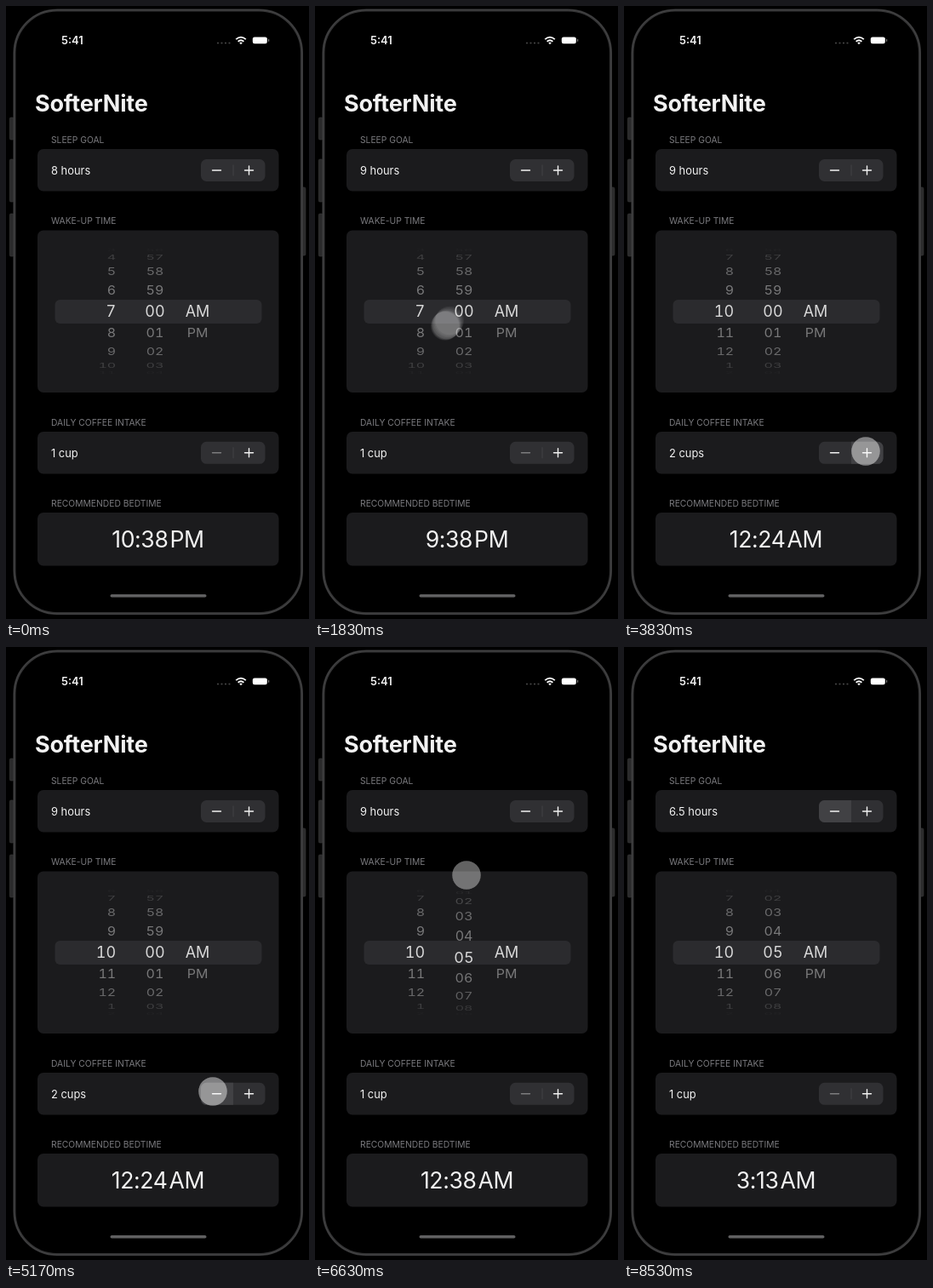
An HTML page for the animation above (8760 ms loop, 356 by 720 pixels).

```html
<!DOCTYPE html>
<html lang="en">
<head>
<meta charset="utf-8">
<title>Bedtime planner</title>
<style>
  html, body { margin: 0; width: 100%; height: 100%; overflow: hidden; background: #000; }
  svg { display: block; width: 100vw; height: 100vh; font-family: Inter, Roboto, sans-serif; fill: #f2f2f2; }
  .card { fill: #1b1b1d; }
  .head { font-size: 10.3px; fill: #7b7b7f; }
  .value { font-size: 12.9px; }
  .row { font-size: 18px; font-variant-numeric: tabular-nums; }
  .line { fill: none; stroke: #f2f2f2; stroke-width: 1.4; stroke-linecap: round; }
</style>
</head>
<body>
<svg id="stage" viewBox="0 0 356 720" xmlns="http://www.w3.org/2000/svg">
  <rect width="356" height="720" fill="#000"/>
  <g fill="#2b2b2c" stroke="#3b3b3c" stroke-width=".6">
    <rect x="4.3" y="131" width="5" height="26" rx="1.5"/>
    <rect x="4.3" y="180" width="5" height="50" rx="1.5"/>
    <rect x="4.3" y="244" width="5" height="50" rx="1.5"/>
    <rect x="347.5" y="213" width="4.5" height="80" rx="1.5"/>
  </g>
  <rect x="10" y="5" width="337.5" height="708.5" rx="50" fill="#000" stroke="#353536" stroke-width="3"/>
  <rect x="9.4" y="4.4" width="338.7" height="709.7" rx="50.6" fill="none" stroke="#444445" stroke-width="1"/>

  <text x="65" y="44.8" font-size="13" font-weight="600">5:41</text>
  <g fill="#454545">
    <circle cx="249" cy="43.5" r="1.1"/><circle cx="253.5" cy="43.5" r="1.1"/>
    <circle cx="258" cy="43.5" r="1.1"/><circle cx="262.5" cy="43.5" r="1.1"/>
  </g>
  <g fill="none" stroke="#fff" stroke-width="1.8">
    <path d="M270.2 39.2Q276 34 281.8 39.2M272.6 41.7Q276 38.8 279.4 41.7"/>
    <path d="M274.2 43L276 45.2L277.8 43Q276 41.8 274.2 43Z" fill="#fff" stroke="none"/>
  </g>
  <rect x="289.8" y="36.4" width="17" height="7.8" rx="2.2" fill="#fff"/>
  <rect x="308" y="38.8" width="1.2" height="3" rx=".6" fill="#777"/>

  <text x="34" y="123.6" font-size="27" font-weight="700" letter-spacing="-.2">SofterNite</text>

  <text class="head" x="53" y="160.6">SLEEP GOAL</text>
  <rect class="card" x="37" y="168" width="283.5" height="49.5" rx="7"/>
  <text class="value" id="goal" x="53" y="197.8"></text>

  <text class="head" x="53" y="255.7">WAKE-UP TIME</text>
  <rect class="card" x="37" y="263.5" width="283.5" height="190.5" rx="7"/>
  <rect x="57.5" y="345" width="243" height="28" rx="6" fill="#2b2b2e"/>

  <text class="head" x="53" y="492.6">DAILY COFFEE INTAKE</text>
  <rect class="card" x="37" y="500" width="283.5" height="49.5" rx="7"/>
  <text class="value" id="cups" x="53" y="529.6"></text>

  <text class="head" x="53" y="587.6">RECOMMENDED BEDTIME</text>
  <rect class="card" x="37" y="595" width="283.5" height="62.5" rx="7"/>
  <text id="bed" x="178.5" y="636.4" font-size="26.6" letter-spacing="-.4" text-anchor="middle"></text>

  <rect x="122.5" y="691" width="113" height="3.6" rx="1.8" fill="#606061"/>
</svg>
<script>
const LOOP = 8760;
const stage = document.getElementById('stage');
const byId = id => document.getElementById(id);

const ease = {
  in: u => u * u,
  out: u => 1 - (1 - u) ** 2,
  both: u => u * u * (3 - 2 * u)
};
const clamp = v => Math.min(1, Math.max(0, v));
const mix = (a, b, u) => a + (b - a) * u;

// Each key: time, values, easing used to reach it.
const PATH = [
  [1350, [285, 193]],
  [1830, [155, 374], 'in'],
  [2050, [123, 400], 'out'],
  [2150, [123, 400]],
  [2750, [123, 322], 'both'],
  [2900, [123, 322]],
  [3230, [205, 415], 'in'],
  [3560, [284, 523], 'out'],
  [4700, [284, 523]],
  [4980, [243, 522], 'both'],
  [5650, [243, 522]],
  [6080, [178, 392], 'both'],
  [6200, [178, 392]],
  [6630, [178, 268], 'both'],
  [6800, [178, 268]],
  [7150, [247, 193], 'both']
];
const HOUR = [[2150, [7]], [2750, [10], 'both']];
const MINUTE = [[6200, [0]], [6630, [4.77], 'both'], [6800, [5], 'out']];
const FADE = [[40, [0]], [230, [1], 'both'], [8030, [1]], [8220, [0], 'both']];

// Values that jump: time, new value.
const GOAL = [[0, 8], [600, 8.5], [1000, 9], [7230, 8.5], [7530, 8], [7830, 7.5], [8130, 7], [8430, 6.5]];
const CUPS = [[0, 1], [3720, 2], [4200, 3], [5080, 2], [5450, 1]];
const WAKE = [[0, 420], [2850, 600], [6830, 605]];
const COFFEE = [22, 36, 50];

// Held spans: start, end.
const HOLD = {
  goalPlus: [[560, 760], [960, 1160]],
  goalMinus: [[7200, LOOP]],
  cupsPlus: [[3680, 3920], [4180, 4420]],
  cupsMinus: [[5050, 5270], [5430, 5620]]
};

function tween(keys, t) {
  if (t <= keys[0][0]) return keys[0][1];
  for (let i = 1; i < keys.length; i++) {
    const [t0, a] = keys[i - 1], [t1, b, e] = keys[i];
    if (t < t1) {
      const u = (t - t0) / (t1 - t0), v = e ? ease[e](u) : u;
      return a.map((n, k) => mix(n, b[k], v));
    }
  }
  return keys[keys.length - 1][1];
}
const step = (keys, t) => keys.filter(k => k[0] <= t).pop()[1];
const held = (name, t) => HOLD[name].some(([a, b]) => t >= a && t < b);

function add(tag, attrs) {
  const el = document.createElementNS(stage.namespaceURI, tag);
  set(el, attrs);
  return stage.appendChild(el);
}
function set(el, attrs) {
  for (const k in attrs) el.setAttribute(k, attrs[k]);
}
function write(el, text) {
  if (el.textContent !== text) el.textContent = text;
}

function stepper(y) {
  add('rect', { x: 229, y: y - 13, width: 75.5, height: 26, rx: 6.5, fill: '#303033' });
  const left = add('path', { d: `M267 ${y - 13}H235.5a6.5 6.5 0 0 0-6.5 6.5v13a6.5 6.5 0 0 0 6.5 6.5H267Z`, fill: '#414144' });
  const right = add('path', { d: `M267 ${y - 13}H298a6.5 6.5 0 0 1 6.5 6.5v13a6.5 6.5 0 0 1-6.5 6.5H267Z`, fill: '#414144' });
  const bar = add('path', { d: `M267 ${y - 6.5}v13`, stroke: '#434346' });
  const minus = add('path', { class: 'line', d: `M242.5 ${y}h10` });
  add('path', { class: 'line', d: `M280.5 ${y}h10m-5-5v10` });
  return (down, up, canDrop) => {
    set(left, { opacity: down ? 1 : 0 });
    set(right, { opacity: up ? 1 : 0 });
    set(bar, { opacity: down || up ? 0 : 1 });
    set(minus, { opacity: canDrop ? 1 : 0.4 });
  };
}

// A drum of rows, 20 degrees apart, seen from the front.
const SHADE = [0.87, 0.43, 0.36, 0.17, 0.03, 0];
function wheel(x, anchor, label) {
  const rows = Array.from({ length: 9 }, () => add('text', { class: 'row', 'text-anchor': anchor }));
  return pos => rows.forEach((el, i) => {
    const n = Math.round(pos) + i - 4, d = n - pos, far = Math.abs(d);
    const angle = d * 20 * Math.PI / 180, near = clamp(2 - 3 * far);
    const size = mix(0.89, 1, near), k = Math.floor(far);
    const shade = far < 1 ? mix(SHADE[1], SHADE[0], near) : mix(SHADE[k], SHADE[k + 1], far - k);
    const high = size * Math.max(0.02, Math.cos(angle));
    write(el, label(n));
    set(el, {
      transform: `translate(${x} ${358.8 + 73 * Math.sin(angle)}) scale(${size} ${high})`,
      y: 6.5,
      opacity: far > 4.3 ? 0 : shade
    });
  });
}

const pad = n => String(n).padStart(2, '0');
const goalStepper = stepper(193);
const cupsStepper = stepper(524.8);
const hours = wheel(129.2, 'end', n => String((n + 11) % 12 + 1));
const minutes = wheel(175, 'middle', n => pad((n + 60) % 60));
wheel(225, 'middle', n => ['AM', 'PM'][n] || '')(0);

// Several faint discs along the path give the touch its motion blur.
const DISCS = 8;
const discs = Array.from({ length: DISCS }, () => add('circle', { fill: '#fff', r: 16.8 }));

function clock(min) {
  const m = (min + 1440) % 1440, h = Math.floor(m / 60);
  return `${(h + 11) % 12 + 1}:${pad(m % 60)}\u200a${h < 12 ? 'AM' : 'PM'}`;
}

function drawTouch(t) {
  const pressed = Object.keys(HOLD).some(name => held(name, t));
  const strength = (pressed ? 0.44 : 0.38) * tween(FADE, t)[0];
  const opacity = 1 - (1 - strength) ** (1 / DISCS);
  discs.forEach((el, i) => {
    const [cx, cy] = tween(PATH, t + (i - (DISCS - 1) / 2) * 2);
    set(el, { cx, cy, opacity });
  });
}

function draw(t) {
  const goal = step(GOAL, t), cups = step(CUPS, t);
  write(byId('goal'), `${goal} hours`);
  write(byId('cups'), cups === 1 ? '1 cup' : `${cups} cups`);
  write(byId('bed'), clock(step(WAKE, t) - goal * 60 - COFFEE[cups - 1]));
  goalStepper(held('goalMinus', t), held('goalPlus', t), true);
  cupsStepper(held('cupsMinus', t), held('cupsPlus', t), cups > 1);
  hours(tween(HOUR, t)[0]);
  minutes(tween(MINUTE, t)[0]);
  drawTouch(t);
}

const start = performance.now();
function tick() {
  draw((performance.now() - start) % LOOP);
  requestAnimationFrame(tick);
}
tick();
</script>
</body>
</html>
```
